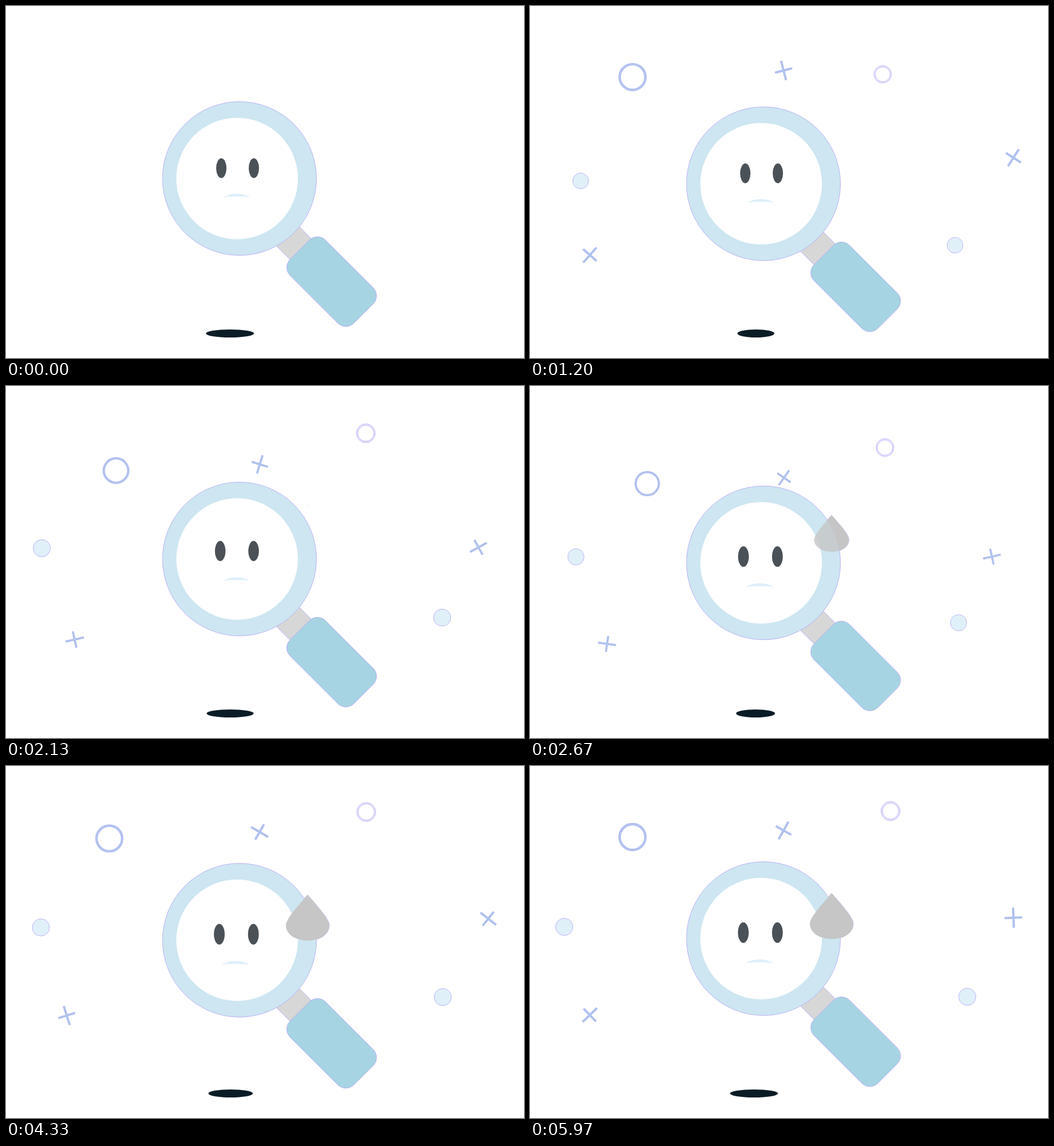
Write an HTML page that moves like this. It is 907x617 px and loops after 6010 ms.

```html
<!DOCTYPE html>
<html lang="en">
<head>
<meta charset="utf-8">
<title>Nothing found</title>
<style>
  html, body { margin: 0; width: 100%; height: 100%; overflow: hidden; background: #fff; }
  svg { display: block; width: 907px; height: 617px; }
  .rim { stroke: #b6aaf8; stroke-width: .9; }
</style>
</head>
<body>
<svg viewBox="0 0 907 617">
  <defs>
    <path id="drop" d="M0-40C14-24 38 2 38 13C38 30 20 40 0 40C-20 40-38 30-38 13C-38 2-14-24 0-40Z"/>
  </defs>
  <ellipse id="shadow" cy="574" ry="7" fill="#0a1c26"/>
  <g id="floaters"></g>
  <g id="body">
    <use id="dropBack" href="#drop" class="rim" fill="#c6c5c5"/>
    <g transform="translate(570.2 483.1) rotate(45)">
      <rect class="rim" x="-135" y="-27.9" width="70" height="52" fill="#d7d7d7"/>
      <rect class="rim" x="-79" y="-43.8" width="158" height="87.6" rx="20" fill="#a6d4e2"/>
    </g>
    <circle class="rim" cx="408.8" cy="302.4" r="134.8" fill="#cde6f1"/>
    <circle cx="404.7" cy="302.4" r="106.5" fill="#fff"/>
    <g id="face">
      <ellipse cx="377" cy="284.2" rx="9" ry="17.3" fill="#4a5157"/>
      <ellipse cx="434" cy="284.2" rx="9" ry="17.3" fill="#4a5157"/>
      <path d="M380.8 335Q404.3 323 427.8 335Q404.3 332.5 380.8 335Z" fill="#ddeffa"/>
    </g>
    <use id="dropFront" href="#drop" fill="#c6c6c6"/>
  </g>
</svg>
<script>
const LOOP = 6010, FRAME = 100 / 3;
const el = id => document.getElementById(id);
const clamp01 = x => Math.min(1, Math.max(0, x));
const mix = (a, b, p) => a + (b - a) * p;
const softEase = p => 0.4 * p + 0.3 * (1 - Math.cos(Math.PI * p));
const span = (t, from, to) => softEase(clamp01((t - from) / (to - from)));

// Piecewise linear through [time, value] points; the first segment extends backwards.
function track(points, t) {
  const last = points[points.length - 1];
  if (t >= last[0]) return last[1];
  let i = 1;
  while (t > points[i][0]) i++;
  const [t0, v0] = points[i - 1], [t1, v1] = points[i];
  return mix(v0, v1, (t - t0) / (t1 - t0));
}

const DISC = { appear: 650, spread: [[730, .54], [1432, 1.108], [2470, .937], [4430, 1]] };
const LINE = { appear: 850, spread: [[900, .755], [1335, 1.11], [2440, .887], [4430, 1]] };

const dot = '<circle class="rim" r="15.1" fill="#e0f0f9"/>';
const bigRing = '<circle r="22.6" fill="#fff" stroke="#a9aff3" stroke-width="4.2"/>' +
  '<circle r="22.6" fill="none" stroke="#b3c8ee" stroke-width="2.4"/>';
const smallRing = '<circle class="rim" r="16.6" fill="#ecedfc"/><circle class="rim" r="14.2" fill="#fff"/>';
const arms = 'd="M0-17.5V17.5M-15.5 0H15.5"';
const cross = `<path ${arms} stroke="#abb2f3" stroke-width="3.8"/><path ${arms} stroke="#aecbea" stroke-width="1.7"/>`;
const linearTurn = (start, perSecond) => t => start + perSecond * t / 1000;
const plusTurn = t => track([[1630, 0], [2670, 35], [3570, 80], [4330, 120], [6000, 211]], t);

// home: resting place, from: the point it flies out of
const floaters = [
  { art: bigRing, kind: LINE, home: [179.5, 124.5], from: [437, 590] },
  { art: smallRing, kind: DISC, home: [631.3, 79], from: [459, 590] },
  { art: dot, kind: DISC, home: [60, 282], from: [420, 590] },
  { art: dot, kind: DISC, home: [765.7, 404.5], from: [496, 590] },
  { art: cross, kind: LINE, home: [444, 113], from: [452, 590], turn: plusTurn },
  { art: cross, kind: LINE, home: [846.5, 266], from: [470, 596], turn: linearTurn(-4, 30.5) },
  { art: cross, kind: LINE, home: [104.7, 436.5], from: [407, 591], turn: linearTurn(-5.1, 38.7) }
];
for (const f of floaters) {
  f.node = document.createElementNS('http://www.w3.org/2000/svg', 'g');
  f.node.innerHTML = f.art;
  el('floaters').append(f.node);
}

function drawFloater(f, t) {
  const s = track(f.kind.spread, t);
  const x = mix(f.from[0], f.home[0], s), y = mix(f.from[1], f.home[1], s);
  const angle = f.turn ? f.turn(t) : 0;
  f.node.setAttribute('visibility', t < f.kind.appear ? 'hidden' : 'visible');
  f.node.setAttribute('transform', `translate(${x} ${y}) rotate(${angle}) scale(${s})`);
}

function draw(t) {
  const phase = t / 1000 % 2;
  const bob = softEase(phase < 1 ? phase : 2 - phase);
  el('body').setAttribute('transform', `translate(0 ${10.6 * bob})`);

  const left = 350 + 15.2 * bob, right = 434.3 - 7.4 * bob;
  el('shadow').setAttribute('cx', (left + right) / 2);
  el('shadow').setAttribute('rx', (right - left) / 2);

  const sad = span(t, 1300, 2850);
  el('face').setAttribute('transform',
    `translate(${-3.5 * sad} ${7.7 * sad}) translate(377 284.2) scale(${1 + .047 * sad}) translate(-377 -284.2)`);

  const grow = span(t, 2000, 2900);
  for (const id of ['dropBack', 'dropFront'])
    el(id).setAttribute('transform', `translate(528 ${202 + 61 * grow}) scale(${grow})`);
  el('dropFront').setAttribute('opacity', grow);
  el('dropBack').setAttribute('visibility', grow > .25 ? 'visible' : 'hidden');

  for (const f of floaters) drawFloater(f, t);
}

const start = performance.now();
function tick() {
  const t = (performance.now() - start) % LOOP;
  draw(Math.min(179, Math.floor((t + 5) / FRAME)) * FRAME);
  requestAnimationFrame(tick);
}
tick();
</script>
</body>
</html>
```
